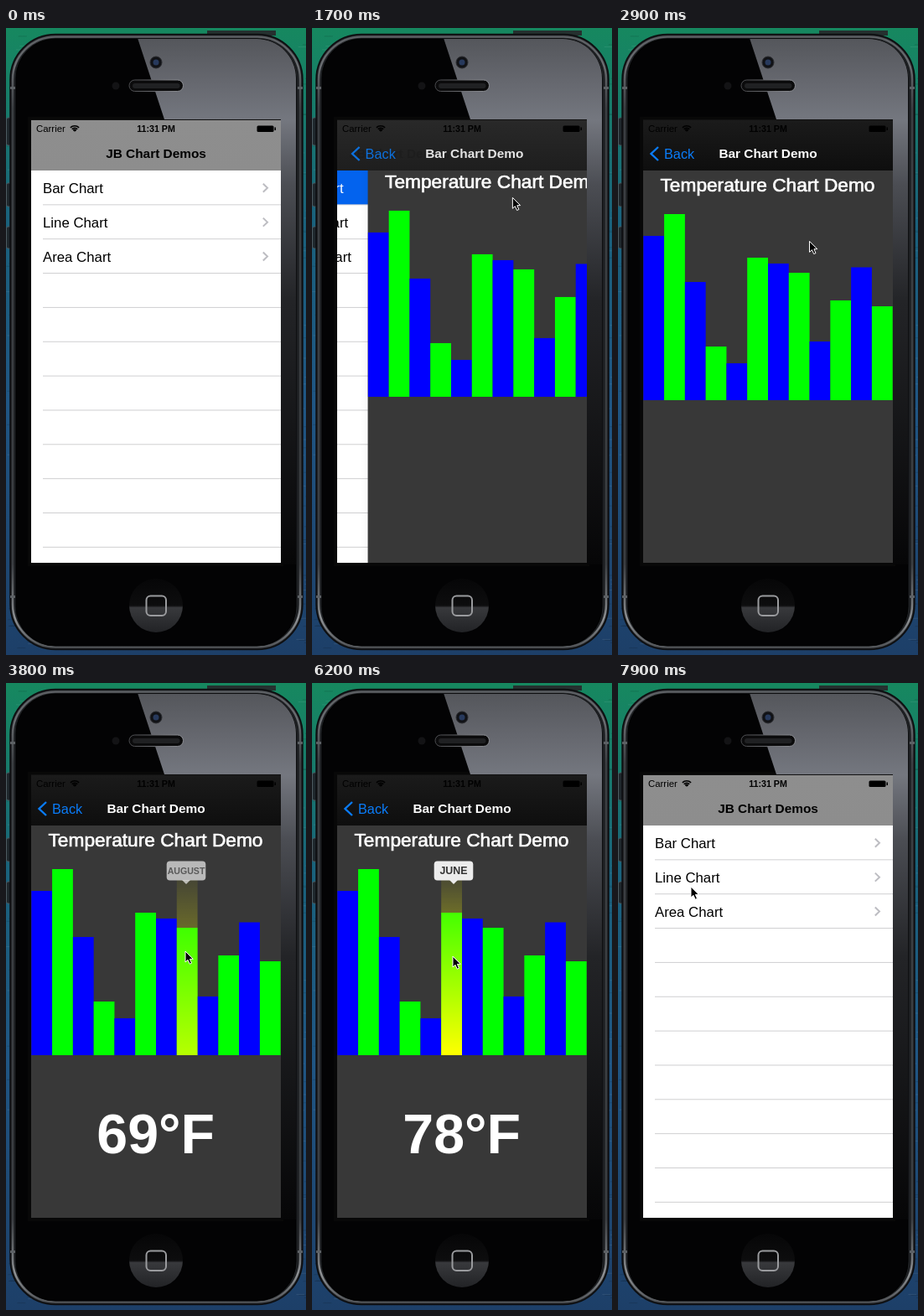
Animation of 358 by 748 pixels, one loop 8000 ms. Source, as an HTML page with a canvas:

```html
<!DOCTYPE html>
<html lang="en">
<head>
<meta charset="utf-8">
<title>Chart demos</title>
<style>
  html, body { margin: 0; width: 100%; height: 100%; overflow: hidden; background: #123c5c; }
  canvas { display: block; }
</style>
</head>
<body>
<canvas id="stage" width="358" height="748"></canvas>
<script>
const g = document.getElementById('stage').getContext('2d');
const LOOP = 8000, PUSH = 1380, POP = 7200, PRESS = 3500, RELEASE = 6400;
const LEFT = 30.3, WIDE = 297.4, NAV = 170, BASE = 444, BAR = WIDE / 12;
const TOPS = [248, 222, 303, 380, 400, 274, 281, 292, 374, 325, 285.5, 332];
const MONTHS = ['JANUARY', 'FEBRUARY', 'MARCH', 'APRIL', 'MAY', 'JUNE', 'JULY',
  'AUGUST', 'SEPTEMBER', 'OCTOBER', 'NOVEMBER', 'DECEMBER'];

// Cursor path: time, x, y
const PATH = [[150, 372, 330], [1000, 243, 195], [1450, 243, 195], [2000, 235, 211],
  [2700, 235, 225], [3350, 214, 320], [4700, 214, 320], [5000, 208, 322], [5400, 185, 326],
  [5750, 168, 326], [6400, 168, 326], [6900, 62, 145], [7300, 62, 145], [7800, 87, 243], [8000, 87, 243]];

const clamp = v => Math.max(0, Math.min(1, v));
const mix = (a, b, p) => a + (b - a) * p;
const grey = v => `rgb(${v},${v},${v})`;
const noise = n => { const v = Math.sin(n * 12.9898) * 43758.5453; return v - Math.floor(v); };

function spring(ms) {
  if (ms <= 0) return 0;
  if (ms > 690) return 1;
  const k = ms * 0.0113;
  return 1 - (1 + k) * Math.exp(-k);
}

function cursorAt(t) {
  const i = PATH.findIndex(p => p[0] >= t);
  if (i < 1) return [PATH[0][1], PATH[0][2]];
  const a = PATH[i - 1], b = PATH[i], p = (t - a[0]) / (b[0] - a[0]);
  return [mix(a[1], b[1], p), mix(a[2], b[2], p)];
}

function ramp(x0, y0, x1, y1, ...stops) {
  const r = g.createLinearGradient(x0, y0, x1, y1);
  stops.forEach(([at, color]) => r.addColorStop(at, color));
  return r;
}

function rect(x, y, w, h, fill) {
  g.fillStyle = fill;
  g.fillRect(x, y, w, h);
}

function box(x, y, w, h, r, fill, stroke, line = 1) {
  g.beginPath();
  g.roundRect(x, y, w, h, r);
  paint(fill, stroke, line);
}

function disc(x, y, r, fill, stroke, line = 1) {
  g.beginPath();
  g.arc(x, y, r, 0, 7);
  paint(fill, stroke, line);
}

function poly(points, fill, stroke, line, open) {
  g.beginPath();
  points.forEach(([x, y]) => g.lineTo(x, y));
  if (!open) g.closePath();
  paint(fill, stroke, line);
}

function paint(fill, stroke, line) {
  if (fill) { g.fillStyle = fill; g.fill(); }
  if (stroke) { g.strokeStyle = stroke; g.lineWidth = line; g.stroke(); }
}

function text(s, x, y, size, color, align = 'left', weight = 400) {
  g.font = `${weight} ${size}px "Liberation Sans", Arial, sans-serif`;
  g.textAlign = align;
  g.fillStyle = color;
  g.fillText(s, x, y);
}

function faded(alpha, draw) {
  if (alpha <= 0) return;
  g.save();
  g.globalAlpha *= alpha;
  draw();
  g.restore();
}

function shifted(x, y, draw) {
  g.save();
  g.translate(x, y);
  draw();
  g.restore();
}

function water() {
  rect(0, 0, 358, 748, ramp(0, 0, 0, 748, [0, '#16885f'], [.14, '#187a6c'], [.3, '#1a627c'],
    [.6, '#205684'], [1, '#1d3f68']));
  for (let i = 0; i < 220; i++) {
    const x = noise(i) * 60 - 30, y = noise(i + 300) * 748;
    rect((x + 358) % 358, y, 10, 1, i % 2 ? 'rgba(0,0,0,.14)' : 'rgba(255,255,255,.08)');
  }
}

function phone() {
  rect(240, 3, 82, 6, '#25302f');
  [[107, 33], [185, 28], [237, 26]].forEach(([y, h]) => box(.5, y, 8, h, 2, '#1f272c', '#4c5a60'));
  box(5, 7.5, 349, 734, 54, '#1d1f22', '#0c0d0f', 1.5);
  box(8, 10.5, 343, 728, 51, null, ramp(0, 8, 0, 742, [0, '#5b5e62'], [.05, '#6a6d71'], [.12, '#3b3e42'],
    [.86, '#3b3e42'], [.95, '#8d9093'], [1, '#4c4f53']), 2.5);
  [70, 677].forEach(y => { rect(5, y, 6, 3, '#5c6064'); rect(348, y, 6, 3, '#5c6064'); });

  // Glass with its diagonal reflection
  box(12, 13, 334, 724, 47, '#030304', '#000');
  g.save();
  g.clip();
  rect(26, 106, 305, 536, '#080808');
  poly([[157, 12], [346, 12], [346, 640], [328, 640], [328, 109], [189, 109]],
    ramp(0, 12, 0, 640, [0, '#54565b'], [.08, '#65676e'], [.155, '#74777f'], [.28, '#4b4d53'],
      [.5, '#232427'], [1, '#060607']));
  g.restore();

  disc(131, 69, 4.5, '#131315');
  disc(179, 41, 7, '#111216', '#2b2c30');
  disc(179, 41, 3.5, '#27395c');
  box(147, 62, 64.5, 13.5, 6.7, '#0b0b0c', ramp(147, 0, 212, 0, [0, '#4a4b4e'], [1, '#8f9196']));
  box(151, 66, 56.5, 6, 3, '#202123');
  disc(179, 689, 32, ramp(0, 657, 0, 721, [0, '#060607'], [.5, '#0d0d0e'], [.54, '#38393c'], [1, '#222326']));
  box(167.5, 677.5, 23.5, 23.5, 5, null, '#9a9b9e', 2);
}

function list(highlight) {
  rect(30, 109, 298, 530, '#fff');
  faded(highlight, () => rect(30, NAV, 298, 41, '#0363ee'));
  for (let i = 1; i < 12; i++) rect(44, NAV + i * 40.85 - .5, 284, 1, '#cfcfd1');
  ['Bar Chart', 'Line Chart', 'Area Chart'].forEach((name, i) => {
    const y = 190.8 + i * 40.85, lit = i ? 0 : highlight;
    text(name, 44, y + 6, 16.8, grey(Math.round(255 * lit)));
    poly([[306.8, y - 5], [312, y], [306.8, y + 5]], null, lit > .5 ? '#e4e9f2' : '#bdbdc2', 2, true);
  });
}

function selection(t) {
  const fade = Math.min(clamp((t - PRESS) / 420), clamp((RELEASE + 300 - t) / 300));
  if (fade <= 0) return;
  const x = cursorAt(Math.min(t, RELEASE) - 150)[0] + 1;
  const i = Math.floor((x - LEFT) / BAR);
  faded(fade, () => {
    rect(LEFT + i * BAR, 235, BAR, BASE - 235,
      ramp(0, 212, 0, BASE, [0, 'rgba(255,255,0,0)'], [1, 'rgb(255,255,0)']));
    box(x - 23.3, 212.5, 46.6, 23, 4, '#ececec');
    poly([[x - 5, 235], [x + 5, 235], [x, 240]], '#ececec');
    const size = MONTHS[i].length < 5 ? 12.4 : 63.6 / MONTHS[i].length;
    text(MONTHS[i], x, 228.3, size, '#333', 'center', 700);
  });
  const shown = Math.min(clamp((t - PRESS) / 200), clamp((RELEASE + 250 - t) / 250));
  faded(shown, () => text(Math.round((BASE - TOPS[i]) / 2.19) + '°F', 178.7, 560.5, 66.3, '#fff', 'center', 700));
}

function detail(t) {
  rect(30, 100, 298, 580, '#383838');
  text('Temperature Chart Demo', 178.5, 195.3, 22.7, '#fff', 'center');
  g.strokeStyle = '#fff';
  g.lineWidth = .7;
  g.strokeText('Temperature Chart Demo', 178.5, 195.3);
  TOPS.forEach((top, i) => rect(LEFT + i * BAR, top, BAR, BASE - top, i % 2 ? '#0f0' : '#00f'));
  selection(t);
}

function navBar(t, p) {
  rect(30, 109, 298, 61, ramp(0, 109, 0, NAV,
    [0, grey(Math.round(mix(142, 27, p)))], [1, grey(Math.round(mix(141, 14, p)))]));
  rect(30, 109, 298, 1, '#111');
  text('Carrier', 36, 124.3, 11.4, '#000');
  text('11:31 PM', 179, 124.3, 10.7, '#000', 'center', 700);
  [2, 4.6, 7.2].forEach((r, i) => {
    g.beginPath();
    g.arc(82, 124, r, -2.36, -.78);
    paint(null, '#000', i ? 1.6 : 2.5);
  });
  box(299.5, 116.5, 20, 7.5, 1.5, '#000');
  rect(320.5, 118.5, 1.5, 3.5, '#000');

  faded(1 - p, () => text('JB Chart Demos', 179 - 85 * p, 155.3, 15.4, '#000', 'center', 700));
  faded(p, () => text('Bar Chart Demo', 179 + 120 * (1 - p), 155.3, 15.4, '#fff', 'center', 700));
  const pressed = t > 6950;
  faded(p * (pressed ? .25 : 1), () => shifted(70 * (1 - p), 0, () => {
    poly([[48, 142], [39.5, 150], [48, 158]], null, '#0a7cf8', 2.4, true);
    text('Back', 55, 155.5, 16.3, '#0a7cf8');
  }));
}

function pointer(t) {
  const [x, y] = cursorAt(t);
  shifted(x, y, () => poly([[0, 0], [0, 13], [3, 10.3], [5.2, 15.2], [7.5, 14.2], [5.4, 9.4], [9.3, 9.3]],
    '#000', '#fff', 1));
}

function draw(t) {
  water();
  phone();
  const p = t < 4000 ? spring(t - PUSH) : 1 - spring(t - POP);
  const highlight = t < 4000 ? +(t >= 1250 && t < 1950) : clamp((POP + 400 - t) / 300);
  const slide = WIDE * (1 - p);
  g.save();
  g.beginPath();
  g.rect(30, 109, 298, 529);
  g.clip();
  if (p < 1) shifted(-.3 * WIDE * p, 0, () => list(highlight));
  if (p > 0) {
    const edge = 30 + slide;
    rect(edge - 9, NAV, 9, 470, ramp(edge - 9, 0, edge, 0,
      [0, 'rgba(0,0,0,0)'], [1, `rgba(0,0,0,${.25 * (1 - p)})`]));
    shifted(slide, t < 4000 ? -33 * (1 - p) : 0, () => detail(t));
  }
  navBar(t, p);
  g.restore();
  if (t >= 150) pointer(t);
}

function tick(now) {
  draw(now % LOOP);
  requestAnimationFrame(tick);
}
requestAnimationFrame(tick);
</script>
</body>
</html>
```
